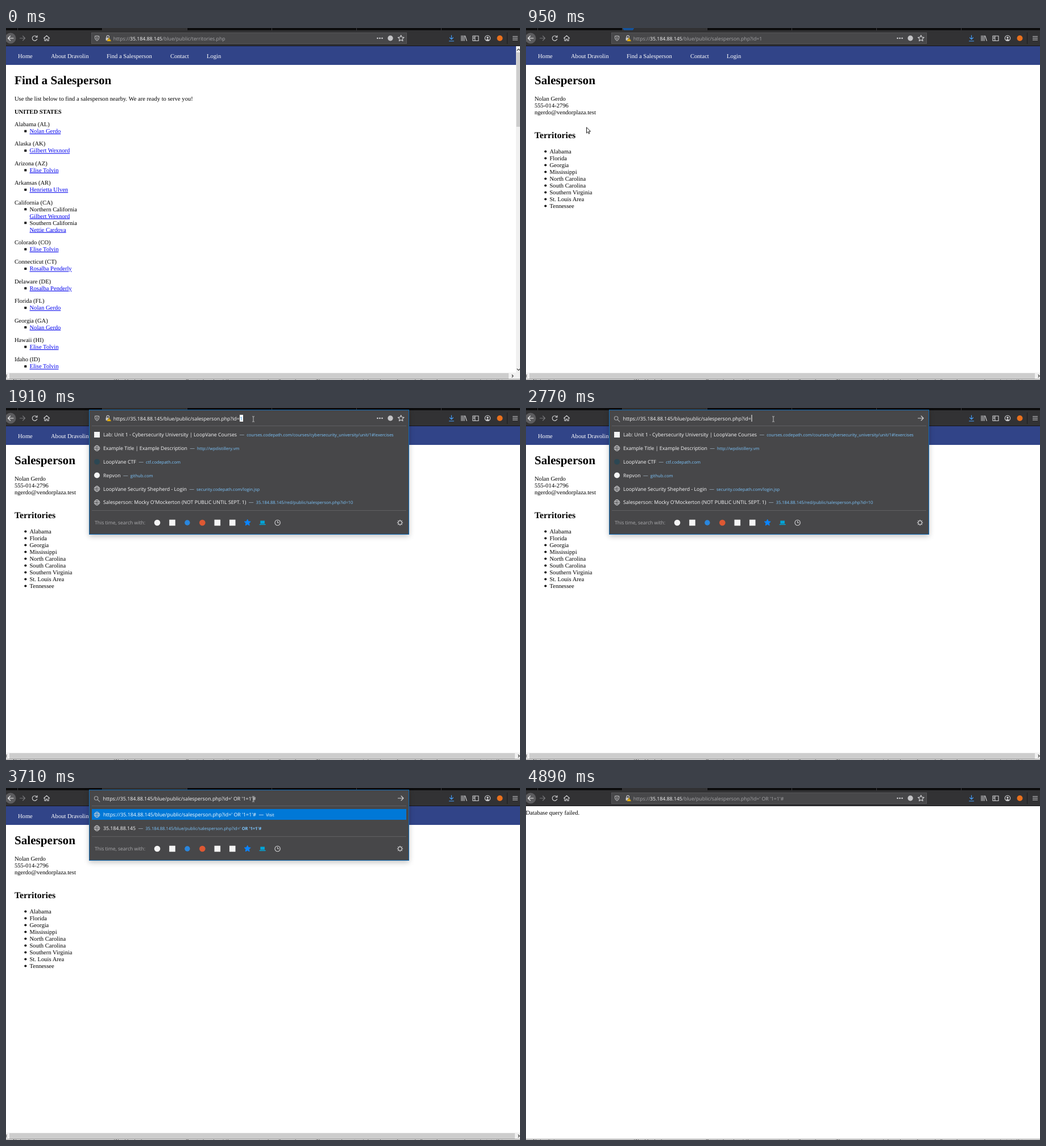
An HTML page for the animation above (5160 ms loop, 904 px wide and 620 px high).

```html
<!DOCTYPE html>
<html lang="en">
<head>
<meta charset="utf-8">
<title>Salesperson lookup</title>
<style>
html, body { margin: 0; width: 100%; height: 100%; overflow: hidden; background: #fff; }
svg { display: block; width: 100%; height: 100%; }
text { font: 8.75px "Open Sans", "Noto Sans", sans-serif; fill: #f9f9fa; white-space: pre; text-rendering: geometricPrecision; }
.page text { font: 10.55px "Liberation Serif", "Times New Roman", serif; fill: #000; }
.page .h1 { font-size: 21.15px; font-weight: bold; }
.page .h2 { font-size: 15.75px; font-weight: bold; }
.page .b { font-weight: bold; }
.page .link { fill: #00e; text-decoration: underline; }
.page .nav { fill: #fff; }
.url { font-size: 8.72px; }
.paste { font-size: 8.85px; }
.coded { font-size: 8.9px; }
.dim { fill: #a5a5a8; }
.sel { fill: #0078d7; }
.addr { font-size: 7.53px; fill: #7cc4fb; }
.dash { fill: #a9bccb; }
.pick tspan { fill: #fff; }
.hint { font-size: 8.6px; fill: #ababae; }
.status { font-size: 7.3px; fill: #333; }
.sliver { font-size: 9px; fill: #555; }
.line { fill: none; stroke: #d4d4d6; stroke-width: 1.1; stroke-linecap: round; stroke-linejoin: round; }
.drop { filter: drop-shadow(0 3px 5px rgba(0, 0, 0, .24)); }
.burst { transform-origin: 180px -3px; animation: burst 5160ms linear infinite; }
@keyframes burst {
  0%, 17.4% { transform: scale(.2); opacity: 0; }
  17.45% { transform: scale(.4); opacity: 1; }
  18.41% { transform: scale(1); opacity: 1; }
  22.09%, 80% { transform: scale(9); opacity: 0; }
  80.03% { transform: scale(.2); opacity: 0; }
  80.05% { transform: scale(.4); opacity: 1; }
  83.9%, 100% { transform: scale(9); opacity: 0; }
}
</style>
</head>
<body>
<svg id="stage" viewBox="0 0 904 620" preserveAspectRatio="none"></svg>
<script>
const LOOP = 5160;
const HOST = '35.184.88.145';
const PATH = '/blue/public/salesperson.php?id=';
const FULL = 'https://' + HOST + PATH;
const INJECT = "' OR '1=1'#";

const text = (x, y, s, cls = '') => `<text x="${x}" y="${y}" class="${cls}">${s}</text>`;
const rect = (x, y, w, h, fill, more = '') => `<rect x="${x}" y="${y}" width="${w}" height="${h}" fill="${fill}" ${more}/>`;
const dot = (x, y, r, fill) => `<circle cx="${x}" cy="${y}" r="${r}" fill="${fill}"/>`;
const line = (d, more = '') => `<path class="line" d="${d}" ${more}/>`;
const at = (x, y, s) => `<g transform="translate(${x} ${y})">${s}</g>`;
// Visible only during the given "from-to" spans (ms)
const on = (spans, s) => `<g data-on="${spans}">${s}</g>`;

/* ---------- pages ---------- */
const nav = w => rect(0, 32, w, 33, '#314488') +
  [[21, 'Home'], [79, 'About Dravolin'], [177, 'Find a Salesperson'], [289, 'Contact'], [353, 'Login']]
    .map(([x, s]) => text(x, 53, s, 'nav')).join('');

const hbar = (end, tip) => rect(0, 607, 904, 11, '#f0f0f0') + rect(6, 608, end - 6, 10, '#cdcdcd') +
  line('M1.5 611l-2 2 2 2', 'style="stroke:#555"') + line(`M${tip - 1} 611l2 2-2 2`, 'style="stroke:#333"');

const [NG, GW, ET, HU, NC, RP] = ['Nolan Gerdo', 'Gilbert Wexnord', 'Elise Tolvin',
  'Henrietta Ulven', 'Nettie Cardova', 'Rosalba Penderly'];
const states = [
  ['Alabama (AL)', NG], ['Alaska (AK)', GW], ['Arizona (AZ)', ET], ['Arkansas (AR)', HU],
  ['California (CA)', '*Northern California', GW, '*Southern California', NC],
  ['Colorado (CO)', ET], ['Connecticut (CT)', RP], ['Delaware (DE)', RP], ['Florida (FL)', NG],
  ['Georgia (GA)', NG], ['Hawaii (HI)', ET], ['Idaho (ID)', ET]
];

function stateList() {
  let y = 173, out = '';
  const bullet = () => rect(32.3, y - 5.3, 3.9, 3.9, '#000');
  for (const [name, ...items] of states) {
    out += text(15, y, name);
    for (const item of items) {
      y += 12;
      const plain = item[0] === '*';
      if (plain || items.length === 1) out += bullet();
      out += text(41.5, y, plain ? item.slice(1) : item, plain ? '' : 'link');
    }
    y += 22.4;
  }
  return out;
}

const findPage = nav(897) + text(15, 99, 'Find a Salesperson', 'h1') +
  text(15, 128, 'Use the list below to find a salesperson nearby. We are ready to serve you!') +
  text(15, 150.5, 'UNITED STATES', 'b') + stateList() +
  rect(897, 32, 7, 575, '#f0f0f0') + rect(897.5, 43, 6.5, 131, '#cdcdcd') +
  line('M899 39.5l2.5-2.5 2.5 2.5M899 600.5l2.5 2.5 2.5-2.5', 'style="stroke:#444"') + hbar(884, 891);

const areas = ['Alabama', 'Florida', 'Georgia', 'Mississippi', 'North Carolina', 'South Carolina',
  'Southern Virginia', 'St. Louis Area', 'Tennessee'];
const personPage = nav(904) + text(15, 99, 'Salesperson', 'h1') +
  text(15, 128, NG) + text(15, 140, '555-014-2796') + text(15, 152, 'ngerdo@vendorplaza.test') +
  text(15, 194, 'Territories', 'h2') +
  areas.map((s, i) => dot(34.3, 217.6 + 12 * i, 2, '#000') + text(41.5, 220.8 + 12 * i, s)).join('') +
  hbar(895, 902);

const status = s => rect(-1, 605.5, 169, 13, '#f9f9fa', 'stroke="#c8c8ca"') + text(0, 615, s, 'status');

const pages = `<g class="page">
  ${on('0-900', findPage)}${on('900-4130', personPage)}
  ${on('4130-5160', text(-.5, 47, 'Database query failed.'))}</g>` +
  on('630-900', status(HOST.slice(1) + PATH + 1)) + on('3940-4130', status(HOST.slice(1)));

const footer = `<g clip-path="url(#foot)">${rect(0, 618, 904, 2, '#f4f4f4')}` +
  text(12, 625, 'Notes list', 'sliver') + text(190, 625, 'Weekly desk summary', 'sliver') +
  text(316, 625, 'Reminder about the open session for all members', 'sliver') +
  text(545, 625, 'The annual session takes place online and all members are welcome to join this', 'sliver') +
  rect(0, 618, 904, 1, '#8a8a8a') + '</g>';

/* ---------- browser bar ---------- */
const globe = `<g id="globe" class="line" style="stroke-width:.9"><circle r="4.7"/><ellipse rx="2.1" ry="4.7"/><path d="M-4.2 -1.7H4.2M-4.2 1.7H4.2"/></g>`;
const starPath = r => 'M' + Array.from({ length: 10 }, (_, i) => {
  const a = Math.PI * (i / 5 - .5), q = i % 2 ? r * .48 : r;
  return (q * Math.cos(a)).toFixed(2) + ' ' + (q * Math.sin(a)).toFixed(2);
}).join('L') + 'Z';

const tabs = rect(0, 0, 904, 5, '#0c0c0d') + rect(169, 0, 149, 5, '#323234') +
  [20, 169, 318, 467, 616, 765].map(x => rect(x, 0, 1, 4, '#3c3c3f')).join('') +
  '<g clip-path="url(#tab)"><circle class="burst" cx="180" cy="-3" r="10" fill="#17539a"/></g>';

const toolbar = rect(0, 4, 904, 28, '#323234') + rect(0, 31, 904, 1, '#151518') +
  dot(8, 18, 9.5, '#5c5c5f') + line('M13 18H3.5m4-4l-4 4 4 4', 'style="stroke:#f0f0f0"') +
  line('M24.5 18h9m-4-4l4 4-4 4', 'style="stroke:#77777a"') +
  line('M54 15.5A4.3 4.3 0 1 0 54.6 19.5M55 13.2v3h-3') +
  line('M66.5 18l5-4.6 5 4.6M68 17.5v5h2.3v-3h2.4v3H75v-5') +
  line('M783.5 13v7m-3-3l3 3 3-3M779.5 23h8', 'style="stroke:#45a1ff"') +
  line('M801 13.5v9M803.5 13.5v9M806 13.5v9M807.5 14l2.7 8.5') +
  line('M821 14h10v8.5h-10zM824.8 14v8.5M822.5 16.5h1M822.5 18.5h1') +
  at(847, 18, line('M-4.7 0a4.7 4.7 0 1 0 9.4 0a4.7 4.7 0 1 0-9.4 0') + dot(0, -1, 1.7, '#d4d4d6') +
    '<path d="M-3 3.2Q0 0 3 3.2Q0 5 -3 3.2" fill="#d4d4d6"/>') +
  dot(868.5, 18, 5, '#e8701d') + rect(881, 8, 1, 20, '#1c1c1e') +
  [14, 17, 20].map(y => rect(891, y + .5, 9, 1, '#d4d4d6')).join('');

const bar = on('0-1590 4010-5160', rect(150.5, 8.5, 554, 19, '#474749', 'stroke="#57575a"')) +
  on('1590-4010', rect(146.5, 3.5, 562, 28, '#474749', 'stroke="#0f6ab4"'));

const siteIcons =
  line('M156.5 14.3q3.5 0 3.5-.6q0 .6 3.5 .6v3q0 3.6-3.5 5.2q-3.5-1.6-3.5-5.2zM160 16v4', 'style="stroke-width:1"') +
  line('M177 17v-1.5a2.2 2.2 0 0 1 4.4 0V17') + rect(175.6, 17, 6.4, 5, '#c4c4c6') +
  '<path d="M181.2 16.8l4 6.4h-8z" fill="#ffbf00" stroke="#474749" stroke-width=".5"/>' + rect(180.8, 19, .9, 2.3, '#474749') +
  [653.5, 657.5, 661.5].map(x => dot(x, 18, 1.3, '#d4d4d6')).join('') +
  dot(676, 18, 4.7, '#c4c4c6') + at(694.7, 18.3, line(starPath(5.6)));

const typeIcons = at(160, 18, line('M1.8 0a3.2 3.2 0 1 1-6.4 0a3.2 3.2 0 1 1 6.4 0M1 2.4l3.8 3.8', 'style="stroke:#a8a8ab"')) +
  line('M689.5 18h9.5m-4-4l4 4-4 4');

/* ---------- suggestions ---------- */
const plainGlobe = '<use href="#globe"/>';
const site = (title, addr, icon = plainGlobe) =>
  ({ icon, s: `${title}<tspan class="dash" dx="4.5">—</tspan><tspan class="addr" dx="4">${addr}</tspan>` });
const visit = tail => ({
  icon: plainGlobe, pick: true,
  s: `<tspan class="paste">${FULL + tail}</tspan><tspan dx="4.5">—</tspan><tspan class="addr" dx="4">Visit</tspan>`
});
const person = (name, id) => site('Salesperson: ' + name, HOST + PATH + id);

const row = (r, i) => {
  const y = 47 + 23.85 * i;
  return (r.pick ? rect(151, y - 10, 553, 19, '#0078d7') : '') + at(160, y, r.icon) +
    text(171, y + 3.2, r.s, r.pick ? 'pick' : '');
};

function engines(y) {
  const x = i => 266 + 26.45 * i;
  const box = (i, c) => rect(x(i) - 5.3, y - 5.3, 10.6, 10.6, c);
  const teeth = Array.from({ length: 8 }, (_, i) =>
    `<path class="line" d="M0 -3.4V-4.8" transform="rotate(${45 * i})"/>`).join('');
  return text(156, y + 3.4, 'This time, search with:', 'hint') +
    dot(x(0), y, 5.3, '#f4f4f4') + box(1, '#f4f4f4') + dot(x(2), y, 4.7, '#2a86dd') + dot(x(3), y, 5.3, '#de5833') +
    box(4, '#f4f4f4') + box(5, '#f4f4f4') +
    at(x(6), y, `<path d="${starPath(5.8)}" fill="#0a84ff" stroke="#0a84ff" stroke-linejoin="round"/>`) +
    at(x(7), y, '<path d="M-3.8 -3.6h7.6v5.4h-7.6zM-5.5 2.6h11v1.4h-11z" fill="#00a5d8"/>') +
    at(x(8), y, line('M-4.7 0a4.7 4.7 0 1 0 9.4 0a4.7 4.7 0 1 0-9.4 0M0 -2.8V0H2.4')) +
    at(693, y, line('M-3.2 0a3.2 3.2 0 1 0 6.4 0a3.2 3.2 0 1 0-6.4 0') + teeth);
}

function panel(span, rows) {
  const end = Math.round(80 + 23.85 * rows.length);
  return on(span, rect(146.5, 3.5, 562, end - 4, '#474749', 'class="drop" stroke="#0f6ab4"') +
    rect(151, 31, 553, 1, '#5f5f62') + rows.map(row).join('') +
    rect(151, end - 43, 553, 1, '#5f5f62') + engines(end - 21));
}

const people = [person(GW, 4), person(ET, 3), person(HU, 6), person(RP, 9)];
const past = site(HOST, HOST + PATH + INJECT);
const match = site(HOST, HOST + PATH + "' <tspan font-weight=\"bold\">OR '1=1'#</tspan>");
const top6 = [
  site('Lab: Unit 1 - Cybersecurity University | LoopVane Courses',
    'courses.codepath.com/courses/cybersecurity_university/unit/1#!exercises', rect(-5, -5, 10, 10, '#f4f4f4')),
  site('Example Title | Example Description', 'http://wpdistillery.vm'),
  site('LoopVane CTF', 'ctf.codepath.com', dot(0, 0, 5, '#2c4753')),
  site('Repvon', 'github.com', dot(0, 0, 5, '#f4f4f4')),
  site('LoopVane Security Shepherd - Login', 'security.codepath.com/login.jsp'),
  site("Salesperson: Mocky O'Mockerton (NOT PUBLIC UNTIL SEPT. 1)", HOST + '/red/public/salesperson.php?id=10')
];
const panels = panel('1700-2840', top6) +
  panel('2840-3260', [visit(''), past, past, ...people]) +
  panel('3260-3440', [visit(INJECT), match, past, ...people]) +
  panel('3440-3940', [visit(INJECT), match]);

/* ---------- address text ---------- */
const Y = 21.7;
const dimUrl = (span, path) => on(span, text(188.7, Y, 'https://', 'url dim') +
  text(218, Y, `${HOST}<tspan class="dim">${path}</tspan>`, 'url'));
const caret = x => rect(x, 12, 1, 12, '#fff');

const address =
  on('0-2770 4010-5160', siteIcons) + on('2770-4010', typeIcons) +
  dimUrl('0-900', '/blue/public/territories.php') + dimUrl('900-1590', PATH + 1) +
  on('1590-1770', rect(188.5, 12, 228.5, 12, '#fff') + text(188.7, Y, FULL + 1, 'url sel')) +
  on('1770-2770', text(188.7, Y, FULL, 'url')) +
  on('1770-1910', text(411.3, Y, 1, 'url')) +
  on('1910-2770', rect(411, 12, 6, 12, '#fff') + text(411.3, Y, 1, 'url sel')) +
  on('2770-3200', text(170.5, Y, FULL, 'paste') + caret(396.5)) +
  on('3200-3940', text(170.5, Y, FULL + INJECT, 'paste')) + on('3200-3710', caret(440)) +
  on('3940-4010', text(170.5, Y, FULL + '%27%20OR%20%271=1%27#', 'coded') + caret(518)) +
  dimUrl('4010-5160', PATH + INJECT);

/* ---------- pointer ---------- */
const pen = 'fill="#fff" stroke="#000" stroke-width=".9" stroke-linejoin="round"';
const pointer = '<g id="pointer">' +
  on('50-500 900-1520 4650-4890', `<path d="M.5 .5V10.6L2.8 8.4 4.3 11.8 5.9 11.1 4.4 7.7H7.6Z" ${pen}/>`) +
  on('500-900', `<path d="M-.9 7V1a1 1 0 0 1 2 0v3.2l4 .9q1.2.3 1.2 1.6v2.4l-1 3.4H-.4L-3.6 7.8q-.3-1.3 1-1.2z" ${pen}/>`) +
  on('1520-4650', '<path d="M-2 -4.8Q0 -4.8 0 -3.8Q0 -4.8 2 -4.8M0 -4V4M-2 4.8Q0 4.8 0 3.8Q0 4.8 2 4.8" fill="none" stroke="#ccc" stroke-width=".9"/>') +
  '</g>';

const stage = document.getElementById('stage');
stage.innerHTML = `<defs>${globe}
  <clipPath id="tab"><rect x="169" width="149" height="5"/></clipPath>
  <clipPath id="foot"><rect y="618" width="904" height="2"/></clipPath></defs>` +
  rect(0, 0, 904, 620, '#fff') + pages + footer + tabs + toolbar + bar + panels + address + pointer;

/* ---------- timing ---------- */
let css = '';
const pct = ms => (ms / LOOP * 100).toFixed(4) + '%';
function hold(el, name, frames) {
  css += `@keyframes ${name}{${frames.map(([t, rule]) => `${pct(t)}{${rule}}`).join('')}}`;
  el.style.animation = `${name} ${LOOP}ms step-end infinite`;
}

stage.querySelectorAll('[data-on]').forEach((el, i) => {
  const frames = [[0, 'opacity:0']];
  for (const span of el.dataset.on.split(' ')) {
    const [a, b] = span.split('-').map(Number);
    frames.push([a, 'opacity:1']);
    if (b < LOOP) frames.push([b, 'opacity:0']);
  }
  hold(el, 'show' + i, frames);
});

const ease = u => u * u * (3 - 2 * u);
const track = [];
const put = (t, x, y) => track.push([t, `transform:translate(${x.toFixed(1)}px,${y.toFixed(1)}px)`]);
function glide(from, to, steps, a, b) {
  for (let i = 0; i <= steps; i++) {
    const u = i / steps, e = ease(u);
    put(from + (to - from) * u, a[0] + (b[0] - a[0]) * e, a[1] + (b[1] - a[1]) * e);
  }
}
put(0, 760, 516);
glide(50, 560, 8, [760, 516], [87, 181]);
put(900, 98, 176);
put(950, 106, 174.5);
glide(1000, 1140, 2, [112, 184], [131, 216]);
glide(1210, 1520, 5, [150, 204], [435, 19.5]);
put(4650, 380, 80);
put(4710, 318, 170);
put(4770, 480, 290);
put(4830, 760, 399);
hold(document.getElementById('pointer'), 'roam', track);

document.head.appendChild(document.createElement('style')).textContent = css;
</script>
</body>
</html>
```
